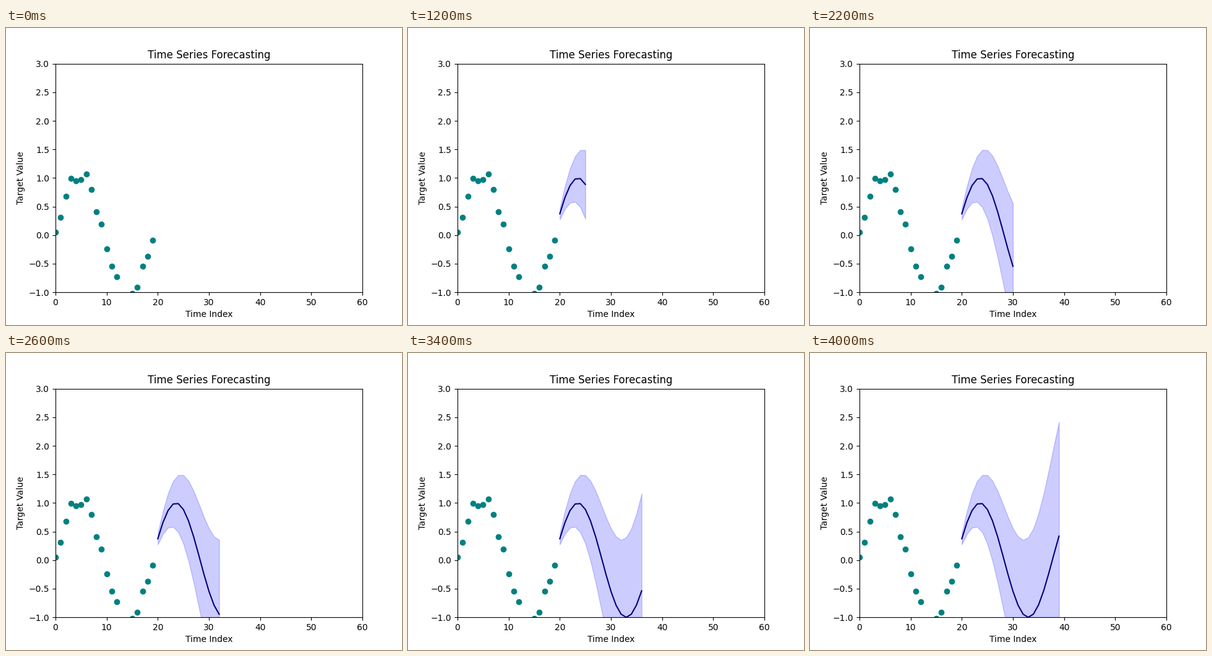
Animation of 640x480 px, one loop 4200 ms. Source, as a matplotlib script:

```python
import numpy as np
import matplotlib.pyplot as plt
from matplotlib.animation import FuncAnimation

OBSERVED = 20
HORIZON = 20


def signal(t):
    return np.sin(t / 3)


rng = np.random.RandomState(42)
past = np.arange(OBSERVED)
values = signal(past) + rng.normal(0, 0.1, OBSERVED)

future = np.arange(OBSERVED, OBSERVED + HORIZON)
forecast = signal(future)
margin = 0.1 * np.arange(1, HORIZON + 1)  # uncertainty grows with each step

fig, ax = plt.subplots(figsize=(6.4, 4.8), dpi=100)
ax.set_xlim(0, 60)
ax.set_ylim(-1, 3)
ax.set_title("Time Series Forecasting")
ax.set_xlabel("Time Index")
ax.set_ylabel("Target Value")
ax.plot(past, values, "o", color="teal")
forecast_line, = ax.plot([], [], color="navy")


def update(steps):
    for band in list(ax.collections):
        band.remove()
    t, y, m = future[:steps], forecast[:steps], margin[:steps]
    forecast_line.set_data(t, y)
    if steps:
        ax.fill_between(t, y - m, y + m, color="blue", alpha=0.2)
    return [forecast_line, *ax.collections]


anim = FuncAnimation(fig, update, frames=HORIZON + 1, interval=200,
                     init_func=lambda: update(0), repeat=True, repeat_delay=0)
plt.show()
```
